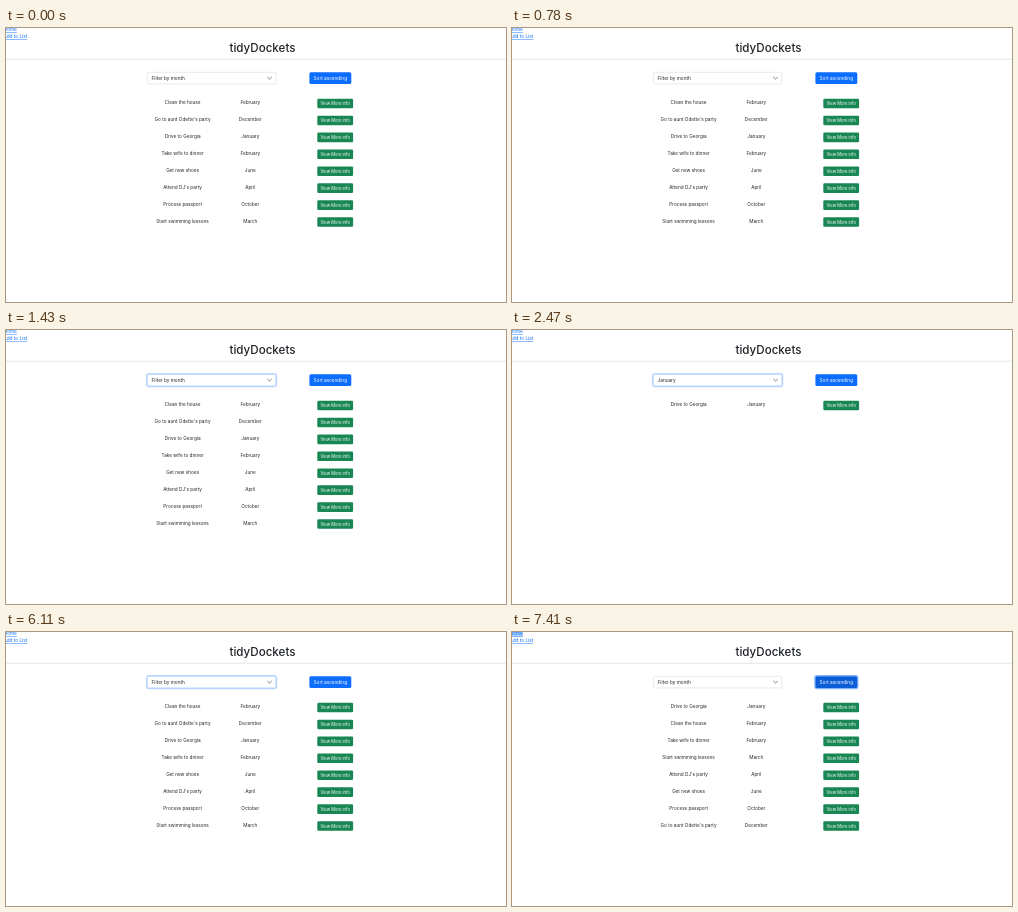
Write an HTML page that moves like this. It is 500x274 px and loops after 8 s.

```html
<!DOCTYPE html>
<html lang="en">
<head>
<meta charset="utf-8">
<title>tidyDockets</title>
<style>
  html, body { margin: 0; width: 100%; height: 100%; overflow: hidden; background: #fff; }
  svg { display: block; width: 100%; height: 100%; }
  text { font: 4.7px Inter, "Open Sans", sans-serif; fill: #212529; }
  .mid { text-anchor: middle; }
  .title { font-size: 11.6px; font-weight: 500; }
  .link { fill: #0d6efd; text-anchor: end; text-decoration: underline; }
  .light { fill: #fff; }
  .small { font-size: 4.15px; }
</style>
</head>
<body>
<svg viewBox="0 0 500 274" preserveAspectRatio="none">
  <rect id="mark" width="11" height="4.3" fill="#a9cdfb"/>
  <text class="link" x="10.8" y="3.4">Home</text>
  <text class="link" x="21.2" y="10.1">Add to List</text>
  <text class="mid title" x="256.5" y="24">tidyDockets</text>
  <rect y="30.8" width="500" height=".7" fill="#d5d9dc"/>

  <rect id="selectRing" x="140.6" y="43.6" width="130" height="13" rx="2" fill="none" stroke="#0d6efd" stroke-opacity=".25" stroke-width="1.3"/>
  <rect id="select" x="141.3" y="44.3" width="128.6" height="11.6" rx="1.5" fill="#fff" stroke-width=".5"/>
  <text id="label" x="145.6" y="51.8"></text>
  <path d="M261.6 49.3l1.9 1.8 1.9-1.8" fill="none" stroke="#343a40" stroke-width=".65" stroke-linecap="round" stroke-linejoin="round"/>

  <rect id="sortRing" x="302.9" y="43.6" width="42.9" height="13" rx="2" fill="none" stroke="#0d6efd" stroke-opacity=".5" stroke-width="1.3"/>
  <rect id="sort" x="303.4" y="44.2" width="41.9" height="11.8" rx="1.5"/>
  <text class="mid light" x="324.3" y="51.8">Sort ascending</text>

  <g id="list"></g>
</svg>
<script>
const LOOP = 8000;
const MONTHS = ["January", "February", "March", "April", "May", "June", "July",
  "August", "September", "October", "November", "December"];
const tasks = [
  ["Clean the house", "February"],
  ["Go to aunt Odette's party", "December"],
  ["Drive to Georgia", "January"],
  ["Take wife to dinner", "February"],
  ["Get new shoes", "June"],
  ["Attend DJ's party", "April"],
  ["Process passport", "October"],
  ["Start swimming lessons", "March"]
];
const sorted = [...tasks].sort((a, b) => MONTHS.indexOf(a[1]) - MONTHS.indexOf(b[1]));
const inMonth = month => tasks.filter(task => task[1] === month);
const ALL = "Filter by month";

// focus and ring: strength of the select and button outlines; hover: button shade
const steps = [
  { at: 0, label: ALL, rows: tasks, focus: 0, hover: 0, ring: 0, mark: 0 },
  { at: 1300, focus: 0.5 },
  { at: 1430, focus: 1 },
  { at: 2470, label: "January", rows: inMonth("January") },
  { at: 4290, label: "February", rows: inMonth("February") },
  { at: 6110, label: ALL, rows: tasks },
  { at: 6760, hover: 1 },
  { at: 7150, focus: 0.5, ring: 0.4, mark: 1 },
  { at: 7280, focus: 0, ring: 0.8, rows: sorted },
  { at: 7410, ring: 1 }
];
const states = [];
steps.forEach((step, i) => states.push({ ...states[i - 1], ...step }));

const el = id => document.getElementById(id);

function mix(from, to, k) {
  return `rgb(${from.map((c, i) => Math.round(c + (to[i] - c) * k))})`;
}

function rowMarkup([name, month], i) {
  return `<g transform="translate(0 ${(i * 16.93).toFixed(2)})">
    <text class="mid" x="176.6" y="76.4">${name}</text>
    <text class="mid" x="244.3" y="76.4">${month}</text>
    <rect x="311.3" y="70.7" width="35.8" height="9.6" rx="1.2" fill="#198754"/>
    <text class="mid light small" x="329.2" y="77">View More info</text>
  </g>`;
}

function draw(s) {
  el("label").textContent = s.label;
  el("list").innerHTML = s.rows.map(rowMarkup).join("");
  el("select").setAttribute("stroke", mix([206, 212, 218], [134, 183, 254], s.focus));
  el("selectRing").setAttribute("opacity", s.focus);
  el("sort").setAttribute("fill", mix([13, 110, 253], [11, 94, 215], s.hover));
  el("sortRing").setAttribute("opacity", s.ring);
  el("mark").setAttribute("opacity", s.mark);
}

const start = performance.now();
let shown = null;
function tick() {
  const t = (performance.now() - start) % LOOP;
  const state = states.findLast(s => s.at <= t) || states[0];
  if (state !== shown) draw(shown = state);
  requestAnimationFrame(tick);
}
tick();
</script>
</body>
</html>
```
